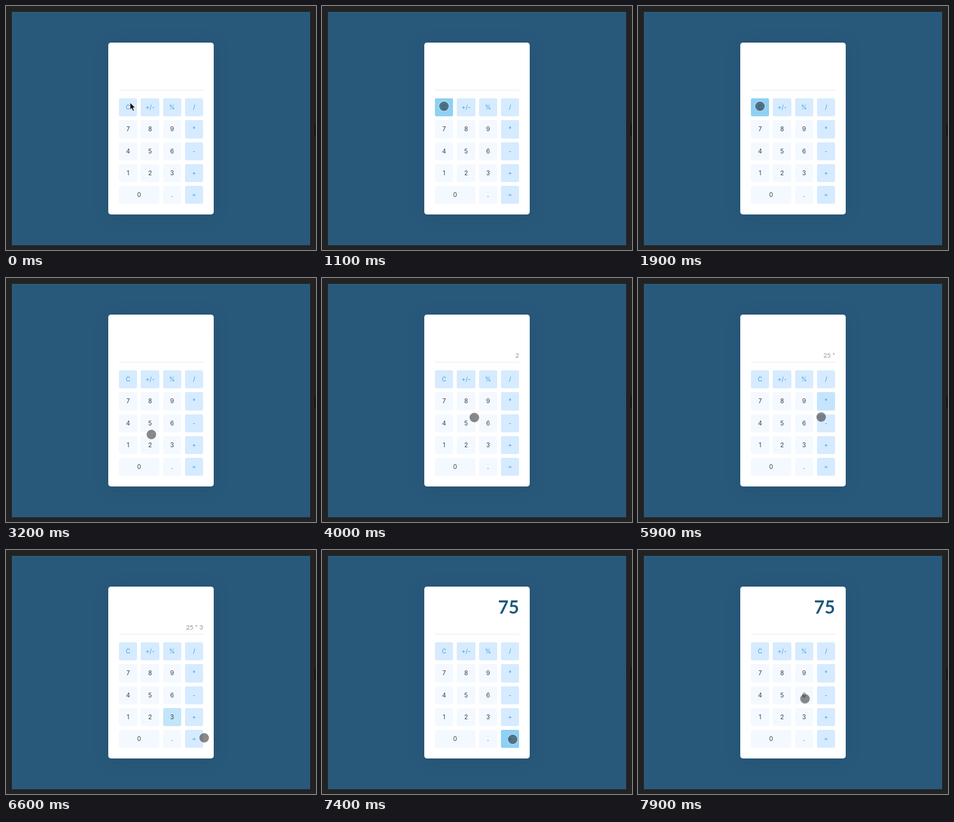
Animation of 582x460 px, one loop 8 s. Source, as an HTML page:

```html
<!DOCTYPE html>
<html lang="en">
<head>
<meta charset="utf-8">
<title>Calculator</title>
<style>
  html, body { margin: 0; width: 100%; height: 100%; overflow: hidden; background: #222; }
  .stage { position: relative; width: 582px; height: 460px; overflow: hidden; }
  .stage::after { content: ""; position: absolute; left: 579px; top: 222px; width: 2px; height: 23px; background: #111; }
  .page { position: absolute; left: 11px; top: 11px; width: 560px; height: 440px; background: #29597a; overflow: hidden; }
  .card {
    position: absolute; left: 192px; top: 68.5px; width: 198px; height: 324.5px;
    border-radius: 5px; background: #fff; box-shadow: 0 3px 28px rgba(18, 58, 100, .22);
  }

  .screen { position: absolute; left: 20px; top: 0; width: 158px; height: 89px; border-bottom: 1px solid #e4e8ec; font-family: Lato, sans-serif; text-align: right; }
  .result { position: absolute; right: 0; top: 17px; font: 700 34px/42px Lato, sans-serif; color: #1a5a7a; animation: result 8s step-end infinite; }
  .window { position: absolute; right: 0; bottom: 2px; width: 100%; height: 20px; overflow: hidden; }
  .reel { font-size: 12px; line-height: 20px; color: #929292; animation: reel 8s step-end infinite; }
  .reel div { height: 20px; }

  .keys { position: absolute; left: 20px; top: 105.5px; display: grid; grid-template-columns: repeat(4, 34.3px); grid-auto-rows: 34.3px; gap: 7px; }
  .key { position: relative; overflow: hidden; border-radius: 3px; background: #f4f9ff; color: #3c4045; font: 11.5px/34.5px Inter, sans-serif; text-align: center; }
  .op { background: #d6ebff; color: #3da2dd; }
  .wide { grid-column: span 2; }
  .key b { position: relative; font-weight: 400; }
  .flash { position: absolute; inset: 0; background: #8fd0f5; opacity: 0; animation: flash 8s linear var(--at) infinite; }

  .arrow { position: absolute; left: 233px; top: 182px; overflow: visible; animation: arrow 8s step-end infinite; }
  .touch {
    position: absolute; left: -9px; top: -9px; width: 18px; height: 18px; border-radius: 50%;
    background: rgba(20, 20, 20, .5); box-shadow: 0 0 1px 1px rgba(255, 255, 255, .55);
    animation: move 8s linear infinite, touch 8s step-end infinite;
  }

  @keyframes flash { 0%, .25% { opacity: 1 } 5.2%, 100% { opacity: 0 } }
  @keyframes arrow { 0% { visibility: visible } 1.2%, 100% { visibility: hidden } }
  @keyframes touch { 0% { visibility: hidden } 1.2%, 100% { visibility: visible } }
  @keyframes result { 0% { opacity: 0 } 92.25%, 100% { opacity: 1 } }
  @keyframes reel {
    0% { transform: none }
    41% { transform: translateY(-20px) }
    54.75% { transform: translateY(-40px) }
    69.75% { transform: translateY(-60px) }
    79.75% { transform: translateY(-80px) }
    92.25%, 100% { transform: translateY(-100px) }
  }
  @keyframes move {
    0%, 1.25% { transform: translate(234px, 187px) }
    6.25%, 7.5% { transform: translate(230px, 189px) }
    8.75% { transform: translate(230px, 190px) }
    11.25%, 24% { transform: translate(229px, 189px) }
    26.25% { transform: translate(230px, 195px) }
    30% { transform: translate(238px, 255px) }
    33.75% { transform: translate(247px, 314px) }
    36.25%, 38.75% { transform: translate(273px, 303px) }
    40%, 48.75% { transform: translate(273px, 295px) }
    50% { transform: translate(286px, 263px) }
    52.5% { transform: translate(281px, 270px) }
    57.5% { transform: translate(284px, 270px) }
    60% { transform: translate(290.5px, 269.5px) }
    63.75% { transform: translate(329px, 269px) }
    65% { transform: translate(350px, 217px) }
    66.25%, 69% { transform: translate(357px, 223px) }
    73.75% { transform: translate(344px, 262px) }
    77.5%, 78.75% { transform: translate(317px, 316px) }
    80% { transform: translate(323px, 320px) }
    81.25% { transform: translate(348px, 340px) }
    82.5% { transform: translate(372px, 354px) }
    85% { transform: translate(366px, 362px) }
    87.5%, 91.25% { transform: translate(358px, 359px) }
    92.5% { transform: translate(358px, 357px) }
    96.25% { transform: translate(345px, 328px) }
    98.75%, 100% { transform: translate(313.5px, 280.5px) }
  }
</style>
</head>
<body>
<div class="stage">
  <div class="page"></div>
  <div class="card">
    <div class="screen">
      <div class="result">75</div>
      <div class="window">
        <div class="reel"><div></div><div>2</div><div>25</div><div>25 *</div><div>25 * 3</div><div></div></div>
      </div>
    </div>
    <div class="keys">
      <div class="key op"><i class="flash" style="--at:1.08s"></i><i class="flash" style="--at:1.88s"></i><b>C</b></div>
      <div class="key op"><b>+/-</b></div>
      <div class="key op"><b>%</b></div>
      <div class="key op"><b>/</b></div>
      <div class="key"><b>7</b></div>
      <div class="key"><b>8</b></div>
      <div class="key"><b>9</b></div>
      <div class="key op"><i class="flash" style="--at:5.58s"></i><b>*</b></div>
      <div class="key"><b>4</b></div>
      <div class="key"><i class="flash" style="--at:4.38s"></i><b>5</b></div>
      <div class="key"><b>6</b></div>
      <div class="key op"><b>-</b></div>
      <div class="key"><b>1</b></div>
      <div class="key"><i class="flash" style="--at:3.28s"></i><b>2</b></div>
      <div class="key"><i class="flash" style="--at:6.38s"></i><b>3</b></div>
      <div class="key op"><b>+</b></div>
      <div class="key wide"><b>0</b></div>
      <div class="key"><b>.</b></div>
      <div class="key op"><i class="flash" style="--at:7.38s"></i><b>=</b></div>
    </div>
  </div>
  <svg class="arrow" width="12" height="18"><path d="M0 0V13.5L3 10.8L5.2 16L7.6 15L5.4 9.9H9.5Z" fill="#000" stroke="#fff" stroke-width=".9"/></svg>
  <div class="touch"></div>
</div>
</body>
</html>
```
